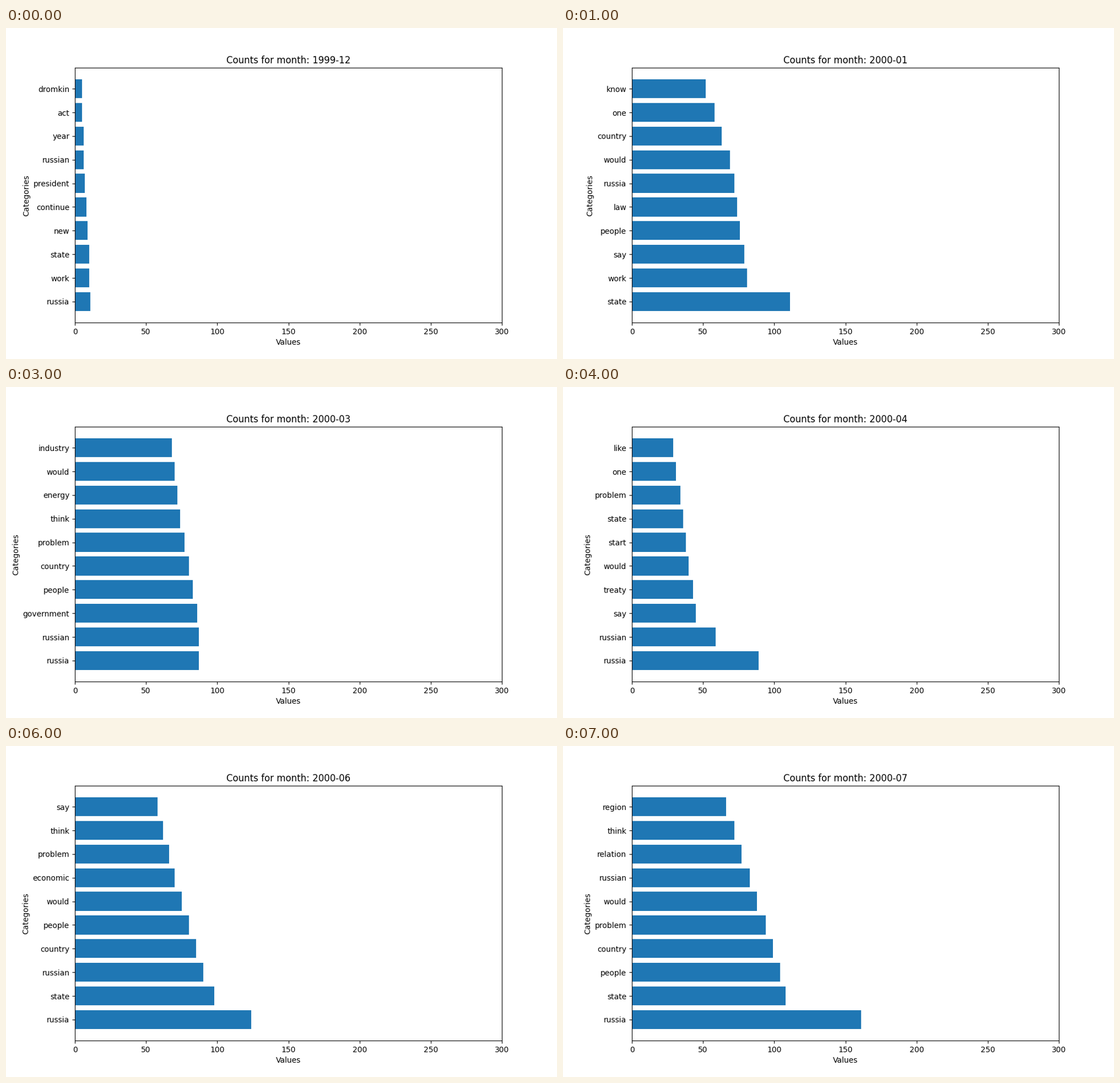
A matplotlib script that plays this animation: 966x580 px, repeating every 8000 ms.

```python
import matplotlib.pyplot as plt
import numpy as np
from matplotlib.animation import FuncAnimation

WIDTH, HEIGHT, DPI = 966, 580, 100
PAGE_W, PAGE_H = 1000, 600    # the chart is laid out on this page, then shrunk
FIRST_MONTH = 1999 * 12 + 11  # months counted from year 0, December 1999

# Words of each month, most frequent first, and their counts at KEY_RANKS.
KEY_RANKS = [0, 1, 2, 6, 9]
MONTHS = [
    ("russia work state new continue president russian year act dromkin",
     [11, 10, 10, 6, 5]),
    ("state work say people law russia would country one know",
     [111, 81, 79, 69, 52]),
    ("russia people state problem say would country russian think one",
     [96, 88, 80, 64, 53]),
    ("russia russian government people country problem think energy would industry",
     [87, 87, 86, 74, 68]),
    ("russia russian say treaty would start state problem one like",
     [89, 59, 45, 36, 29]),
    ("russia russian state people country would today president must federation",
     [94, 88, 79, 57, 54]),
    ("russia state russian country people would economic problem think say",
     [124, 98, 90, 70, 58]),
    ("russia state people country problem would russian relation think region",
     [161, 108, 104, 83, 66]),
]

plt.rcParams["font.family"] = "DejaVu Sans"


def cubic(d):
    near = 1.5 * d**3 - 2.5 * d**2 + 1
    far = -0.5 * d**3 + 2.5 * d**2 - 4 * d + 2
    return np.where(d < 1, near, np.where(d < 2, far, 0))


def shrink_weights(size, full):
    """Matrix that scales one image axis by size / full."""
    scale = size / full
    pos = np.minimum((np.arange(size) + 0.5) / scale - 0.5, size - 1)
    weights = cubic(np.abs(np.arange(size) - pos[:, None]) * scale)
    return weights / weights.sum(axis=1, keepdims=True)


def shrink(image, dpi):
    rows = shrink_weights(image.shape[0], PAGE_H)
    cols = shrink_weights(image.shape[1], PAGE_W)
    small = cols @ np.tensordot(rows, image, 1)
    return np.rint(np.clip(small, 0, 1) * 255).astype(np.uint8), 0, 0


def month_name(index):
    year, month = divmod(FIRST_MONTH + index, 12)
    return f"{year}-{month + 1:02d}"


def draw(index):
    words, key_counts = MONTHS[index]
    words = words.split()
    counts = np.rint(np.interp(range(len(words)), KEY_RANKS, key_counts))
    ax.clear()
    ax.barh(words, counts, color="#1f77b4")
    ax.set_xlim(0, 300)
    ax.set_xlabel("Values")
    ax.set_ylabel("Categories")
    ax.set_title(f"Counts for month: {month_name(index)}")


# The tiny margin keeps the pixel size from rounding down.
fig, ax = plt.subplots(
    figsize=((WIDTH + 1e-6) / DPI, (HEIGHT + 1e-6) / DPI), dpi=DPI)
fig.subplots_adjust(left=0.125 * PAGE_W / WIDTH, right=0.9 * PAGE_W / WIDTH,
                    bottom=1 - 0.89 * PAGE_H / HEIGHT,
                    top=1 - 0.12 * PAGE_H / HEIGHT)
fig.set_agg_filter(shrink)

anim = FuncAnimation(fig, draw, frames=len(MONTHS), interval=1000,
                     repeat=True, repeat_delay=0)
plt.show()
```
